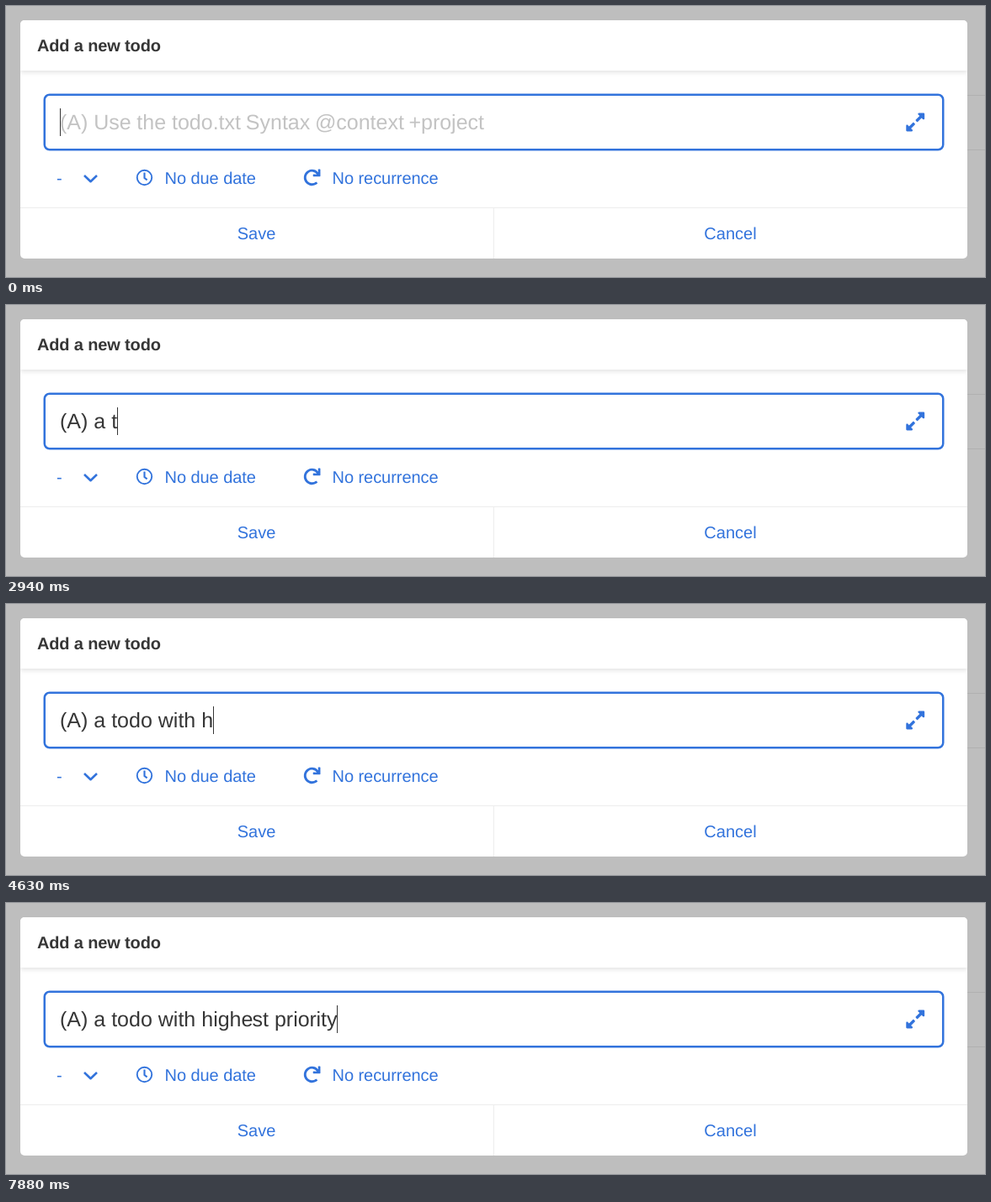
These frames come from a looping animation (1163 by 323 pixels, 8000 ms). An HTML page:

```html
<!DOCTYPE html>
<html lang="en">
<head>
<meta charset="utf-8">
<title>Add a new todo</title>
<style>
  html, body { margin: 0; width: 100%; height: 100%; overflow: hidden; background: #bebebe; }
  svg { display: block; width: 1163px; height: 323px; }
  text {
    font: 20px "Liberation Sans", Arial, sans-serif;
    fill: #3273dc;
    white-space: pre;
    text-rendering: geometricPrecision;
  }
  .title { font-weight: bold; fill: #363636; letter-spacing: -.15px; }
  .field { font-size: 25px; fill: #363636; }
  .hint { fill: #c3c3c3; }
  .icon { fill: #3273dc; }
  .line { fill: none; stroke: #3273dc; }
</style>
</head>
<body>
<svg viewBox="0 0 1163 323">
  <defs>
    <clipPath id="card"><rect x="17" y="17" width="1125" height="284" rx="5"/></clipPath>
    <filter id="shade" x="-5%" y="-20%" width="110%" height="150%">
      <feDropShadow dx="0" dy="2.5" stdDeviation="2.5" flood-color="#0a0a0a" flood-opacity=".1"/>
    </filter>
    <path id="arrow" d="M235.3 196.7L328 104l-33-31C280 58 290.700 32 312 32h112c13.300 0 24 10.700 24 24v112c0 21.400-25.800 32-41 17L376 152l-92.700 92.700c-6.200 6.200-16.400 6.200-22.600 0l-25.400-25.400c-6.200-6.200-6.200-16.400 0-22.600z"/>
  </defs>

  <rect width="1163" height="323" fill="#bebebe"/>
  <path d="M1142 106.500h21M1142 171.500h21" stroke="#b0b0b0"/>

  <g clip-path="url(#card)">
    <rect x="17" y="17" width="1125" height="284" fill="#fff"/>
    <rect x="17" y="17" width="1125" height="60" fill="#fff" filter="url(#shade)"/>
    <path d="M17 240.500h1125M579.500 241v60" stroke="#ededed"/>
  </g>
  <text class="title" x="37" y="54">Add a new todo</text>

  <rect class="line" x="45.750" y="105.750" width="1067.500" height="65.500" rx="6" stroke-width="2.500"/>
  <text id="hint" class="field hint" y="147"><tspan x="64">(A)</tspan> <tspan x="104.300">Use</tspan> <tspan x="155.300">the</tspan> <tspan x="197">todo.txt</tspan> <tspan x="284.800">Syntax</tspan> <tspan x="366.900">@context</tspan> <tspan x="478.400">+project</tspan></text>
  <text id="typed" class="field" x="64" y="147" xml:space="preserve"></text>
  <rect id="caret" y="122" width="1" height="33" fill="#363636"/>

  <g class="icon" transform="translate(1069.300 126) scale(.0488)">
    <use href="#arrow"/>
    <use href="#arrow" transform="rotate(180 224 256)"/>
  </g>

  <text x="60" y="212">-</text>
  <path class="line" d="M93 202l7.500 7.200 7.500-7.200" stroke-width="2.600" stroke-linejoin="round"/>

  <g class="line" transform="translate(154.500 194.500) scale(.039)" stroke-width="48">
    <circle cx="256" cy="256" r="224"/>
    <path d="M256 104v166l80 58" stroke-width="54"/>
  </g>
  <text x="188.500" y="212" letter-spacing="-.05">No due date</text>

  <path class="icon" transform="translate(353.500 194.500) scale(.039)"
    d="M500 0h-47a12 12 0 0 0-12 12.600l4 82.700A247.400 247.400 0 0 0 256 8a248 248 0 1 0 166 432a12 12 0 0 0 .500-17.400l-34-34a12 12 0 0 0-16.400-.500A176 176 0 1 1 402 157.800l-101.500-4.900a12 12 0 0 0-12.500 12v47.400a12 12 0 0 0 12 12h200a12 12 0 0 0 12-12V12a12 12 0 0 0-12-12z"/>
  <text x="387.500" y="212" letter-spacing="-.05">No recurrence</text>

  <text x="297.500" y="278" text-anchor="middle">Save</text>
  <text x="860.500" y="278" text-anchor="middle">Cancel</text>
</svg>
<script>
  const LOOP = 8000;
  const LEFT = 64;
  const PHRASE = "(A) a todo with highest priority";
  // Time at which each character of the phrase appears.
  const KEYS = [
    630, 810, 1060, 1500, 2380, 2690,
    2940, 3130, 3130, 3250, 3500,
    3560, 3690, 3880, 4000, 4190,
    4630, 4940, 5250, 5380, 5690, 5940, 6060, 6310,
    6630, 6810, 6880, 7000, 7250, 7500, 7750, 7880
  ];
  const BLINKS = [[190, 630], [2130, 2380]];
  // Pair kerning, by character index.
  const KERN = { 21: -.9, 29: -.5 };

  const [hint, typed, caret] = ["hint", "typed", "caret"].map(id => document.getElementById(id));
  typed.setAttribute("dx", [...PHRASE].map((_, i) => KERN[i] || 0).join(" "));
  let shown = -1;

  function setText(count) {
    if (count === shown) return;
    shown = count;
    typed.textContent = PHRASE.slice(0, count);
    hint.style.display = count ? "none" : "";
    const end = count ? typed.getEndPositionOfChar(count - 1).x : LEFT;
    caret.setAttribute("x", Math.floor(end));
  }

  function draw(time) {
    setText(KEYS.filter(key => key <= time).length);
    const hidden = BLINKS.some(([from, to]) => time >= from && time < to);
    caret.style.display = hidden ? "none" : "";
  }

  const start = performance.now();
  function tick() {
    draw((performance.now() - start) % LOOP);
    requestAnimationFrame(tick);
  }
  tick();
</script>
</body>
</html>
```
